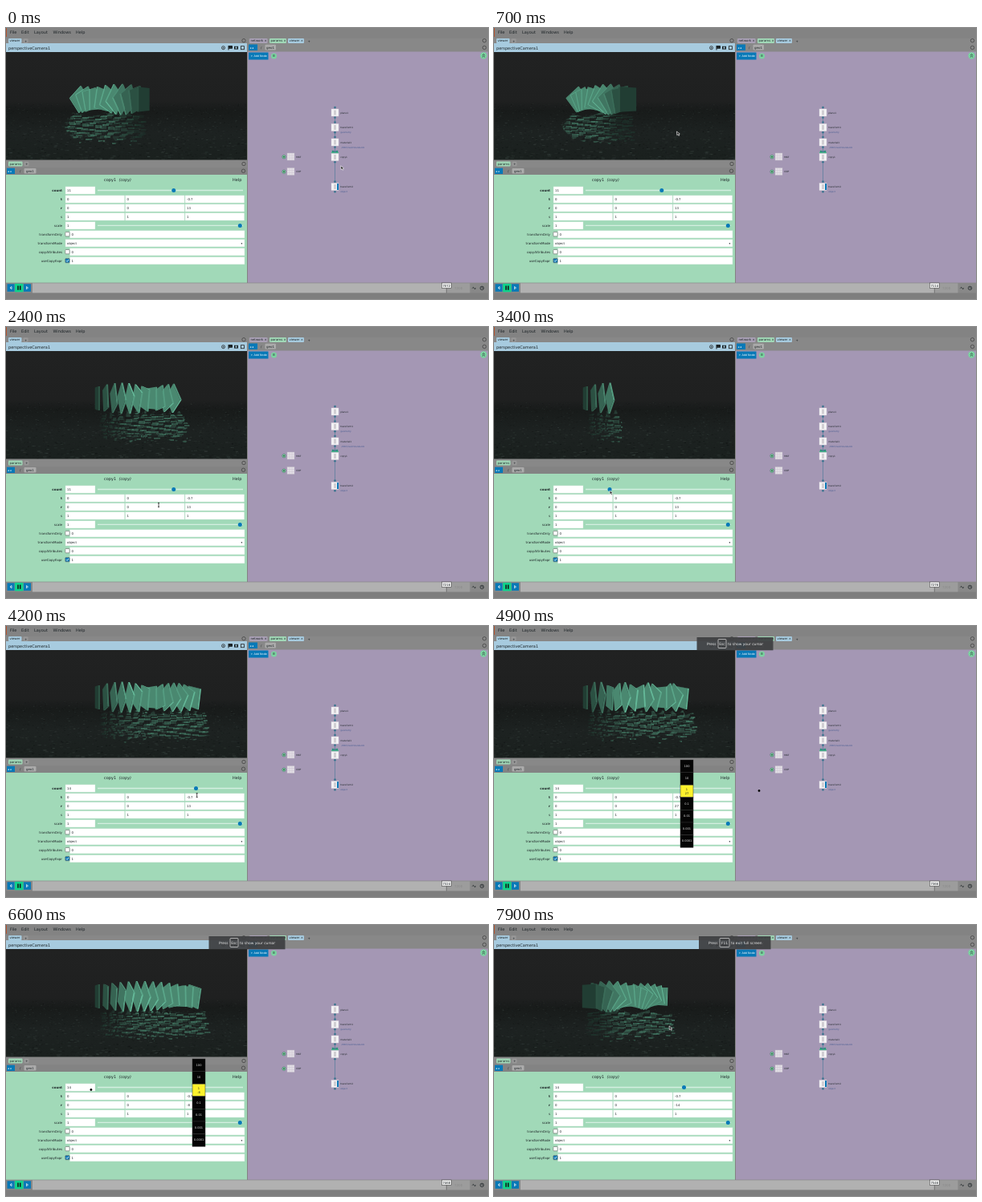
Animation, 600 px wide and 338 px high, one loop 8 s. Source, as an HTML page with a canvas:

```html
<!DOCTYPE html>
<html lang="en">
<head>
<meta charset="utf-8">
<title>Node editor</title>
<style>
html, body { margin: 0; width: 600px; height: 338px; overflow: hidden; background: #838383; }
canvas, svg { position: absolute; left: 0; top: 0; }
canvas { top: 30px; }
text { font-family: "DejaVu Sans", sans-serif; white-space: pre; }
</style>
</head>
<body>
<canvas id="view" width="300" height="135"></canvas>
<svg id="ui" width="600" height="338"></svg>
<script>
const LOOP = 8000, BLUE = '#0879b7', GREEN = '#7bd3a0', SKY = '#a7cbdf', INK = '#1c2326', GREY = '#838383';
const $ = id => document.getElementById(id);
const parts = [];
const add = s => parts.push(s);
const rect = (x, y, w, h, fill, more = '') => add(`<rect x="${x}" y="${y}" width="${w}" height="${h}" fill="${fill}" ${more}/>`);
const dot = (x, y, r, fill, more = '') => add(`<circle cx="${x}" cy="${y}" r="${r}" fill="${fill}" ${more}/>`);
const path = (d, stroke, more = '') => add(`<path d="${d}" fill="none" stroke="${stroke}" ${more}/>`);
const text = (x, y, s, size = 4, more = '') => add(`<text x="${x}" y="${y}" font-size="${size}" fill="${INK}" ${more}>${s}</text>`);
const ring = (x, y) => dot(x, y, 2.2, 'none', 'stroke="#444" stroke-width=".8"');
const tab = (x, y, w, s, fill) => { rect(x, y, w, 6, fill, 'rx="1"'); text(x + 1.5, y + 4.4, s, 3.9); };

function bars() {
  rect(0, 0, 600, 13, GREY);
  rect(0, 0, 1, 11, '#b0532f');
  [[5, 'File'], [19, 'Edit'], [35, 'Layout'], [58.5, 'Windows'], [87, 'Help']].forEach(([x, s]) => text(x, 7, s, 5));
  rect(0, 13, 600, 6, '#888');
  tab(3, 13, 16.5, 'viewer', SKY);
  rect(21.5, 13.3, 6, 5.4, '#979797', 'rx="1"');
  text(23, 17.5, '+');
  rect(0, 19, 300, 11, SKY);
  text(3, 26.6, 'perspectiveCamera1', 5);
  dot(270.5, 24.7, 2, 'none', 'stroke="#222" stroke-width=".8"');
  dot(270.5, 24.7, .7, INK);
  add(`<path d="M277 22v5.5M277 22.5h4.5v2.8h-4.5" stroke="${INK}" fill="${INK}"/>`);
  rect(284, 22.8, 5, 3.8, INK);
  dot(286.5, 24.7, 1.1, SKY);
  rect(292.5, 22.7, 4, 4, 'none', 'stroke="#222" stroke-width=".8"');
  ring(296, 15.7);
  rect(300, 13, 1, 305, GREY);
}

function network() {
  rect(301, 19, 299, 11, '#888');
  rect(301, 29.5, 299, 288.3, '#a497b4');
  tab(303, 13, 22.5, 'network ×', '#a9a0b5');
  tab(328, 13, 21, 'params ×', '#a1d8b7');
  tab(351, 13, 20, 'viewer ×', SKY);
  text(375.5, 17.5, '+');
  rect(302, 20.5, 11, 7.5, BLUE);
  text(303.5, 26, '◂ ◂', 3.5, 'style="fill:#fff"');
  text(317, 25.8, '/', 4);
  rect(322.5, 20.8, 13.5, 6.6, '#aaa', 'rx="1"');
  text(324, 25.6, 'geo1', 4);
  ring(595.5, 15.7);
  ring(595.5, 24.5);
  rect(302, 30.5, 24.5, 9, BLUE);
  text(304.5, 36.2, '+ Add Node', 3.4, 'style="fill:#fff"');
  dot(333.5, 35, 3.5, GREEN);
  text(331.8, 36.4, '☰', 3.6);
  dot(594.5, 34.5, 4.2, GREEN);
  path('M592.8 34.3l1.7-1.6 1.7 1.6M592.8 36.5l1.7-1.6 1.7 1.6', INK, 'stroke-width=".7"');
  path('M409.5 98V194', '#557b9d', 'stroke-width=".7"');
  const names = ['plane1', 'transform1', 'material1', 'copy1', 'transform2'];
  [101, 119.5, 138, 156.5, 193.5].forEach((y, i) => {
    rect(405, y, 9, 9, '#f3f2f4', 'stroke="#d5d0da" stroke-width=".4"');
    path(`M409.5 ${y + 1.5}v6`, '#cbc8ce', 'stroke-width="2.5"');
    dot(409.5, y - 2, 1.3, '#39748e');
    dot(409.5, y + 10.8, 1.3, '#39748e');
    text(416.2, y + 5.5, names[i], 2.9);
  });
  path('M405 155.5h9', '#48b78a', 'stroke-width="1.2"');
  dot(407, 154, 1.3, '#2c937c');
  dot(412, 154, 1.3, '#2c937c');
  rect(412, 194, 2, 8, BLUE);
  const note = 'style="fill:#475c91"';
  text(416.2, 131, 'geometry', 2.8, note);
  text(417.5, 149.5, '/MAT/meshStandard1', 2.7, note);
  text(416.2, 205.2, 'object', 2.8, note);
  [[156, 'MAT'], [174.5, 'COP']].forEach(([y, s]) => {
    rect(350, y, 9, 9, '#e4e0e7', 'stroke="#bdb5c4" stroke-width=".5"');
    path(`M350 ${y + 3}h9M350 ${y + 6}h9M353 ${y}v9M356 ${y}v9`, '#c9c3cf', 'stroke-width=".5"');
    dot(346, y + 4.7, 2.2, GREEN, 'stroke="#356b58" stroke-width=".5"');
    dot(346, y + 4.7, .8, INK);
    text(361.2, y + 5.5, s, 2.9);
  });
}

function params() {
  rect(0, 164.5, 300, 9.5, '#888');
  tab(3, 166.5, 17.5, 'params', '#a1d8b7');
  rect(22.5, 166.8, 6, 5.4, '#979797', 'rx="1"');
  text(24, 171.3, '+');
  rect(0, 174, 300, 9, GREY);
  rect(1, 174.7, 10, 7.3, BLUE);
  text(2, 180, '◂ ◂', 3.5, 'style="fill:#fff"');
  text(17, 180, '/', 4);
  rect(22.5, 175, 15, 6.5, '#aaa', 'rx="1"');
  text(25, 179.7, 'geo1', 3.9);
  ring(296, 169.5);
  ring(295.5, 178.3);
  rect(0, 183, 300, 134.8, '#a1d9b8');
  text(122, 191, 'copy1', 5);
  text(140.5, 191, '(copy)', 4.9, 'font-style="italic"');
  text(282, 191, 'Help', 5);
  const rows = ['count', 't', 'r', 's', 'scale', 'transformOnly', 'transformMode', 'copyAttributes', 'useCopyExpr'];
  const field = (x, y, w, s, id) => {
    rect(x, y - 4.6, w, 9.2, '#fff', 'stroke="#c6e2d2" stroke-width=".4"');
    text(x + 2, y + 1.4, s, 3.9, id ? `id="${id}"` : '');
  };
  const vectors = { 1: ['0', '0', '-0.7'], 2: ['0', '0', '13'], 3: ['1', '1', '1'] };
  rows.forEach((name, i) => {
    const y = 202.5 + i * 10.97;
    text(70, y + 1.3, name, 4, 'text-anchor="end"' + (i < 3 ? ' font-weight="bold"' : ''));
    if (vectors[i]) vectors[i].forEach((s, k) => field(74 + k * 74.5, y, 73.7, s, i == 2 && k == 2 ? 'turn' : ''));
    else if (i == 0 || i == 4) {
      field(74, y, 37, i ? '1' : '11', i ? '' : 'count');
      path(`M114 ${y}H295`, '#d3eee0', 'stroke-width="1.4"');
      dot(i ? 291.3 : 208.8, y, 2.5, BLUE, i ? '' : 'id="knob"');
    } else if (i == 6) {
      field(74, y, 223, 'object');
      text(292.5, y + 1.2, '▾', 3.5);
    } else {
      field(79.5, y, 217.5, i == 8 ? '1' : '0');
      rect(73.8, y - 2.8, 5.3, 5.3, i == 8 ? BLUE : '#fff', 'rx=".8" stroke="#666" stroke-width=".6"');
      if (i == 8) path(`M75 ${y}l1.1 1.1 2-2.5`, '#fff', 'stroke-width=".8"');
    }
  });
}

function timeline() {
  rect(0, 317.8, 600, 20.2, '#888');
  rect(0, 330.5, 600, 7.5, '#7e7e7e');
  rect(33, 318.3, 515.5, 12, '#b1b1b1');
  rect(548.5, 318.3, 29, 12, '#9c9c9c');
  rect(1.5, 319.3, 9, 9.5, BLUE);
  rect(11, 318.8, 10.5, 10.5, '#10d28b');
  rect(22, 319.3, 9, 9.5, BLUE);
  path('M7 322.5l-2 1.6 2 1.6zM25.5 322.5l2 1.6-2 1.6z', '#fff', 'stroke-width=".7"');
  path('M15 321.5v5.2M17.7 321.5v5.2', '#111', 'stroke-width="1.5"');
  path('M548.3 318v12.5', '#555', 'stroke-width=".6"');
  rect(542.3, 318, 12, 6.4, '#eee', 'stroke="#333" stroke-width=".5"');
  text(548.3, 322.6, '', 3.8, 'id="frame" text-anchor="middle"');
  text(558, 325.5, '7200', 4, 'style="fill:#888"');
  path('M580.5 324.5q1.2-2 2.2 0t2.2 0', INK, 'stroke-width="1"');
  dot(592.5, 324.4, 2.2, 'none', `stroke="${INK}" stroke-width=".8"`);
  path('M592.5 323v1.5h1.2', INK, 'stroke-width=".6"');
}

function overlays() {
  add('<g id="ladder">');
  ['100', '10', '1', '0.1', '0.01', '0.001', '0.0001'].forEach((s, i) => {
    const y = 167 + i * 15.6, now = i == 2;
    rect(232, y, 16, 15.6, now ? '#fdf22c' : '#050505', 'stroke="#2c2c2c" stroke-width=".5"');
    text(240, y + (now ? 6.3 : 8.7), s, 3.6, `text-anchor="middle" style="fill:${now ? '#222' : '#ddd'}"`);
  });
  text(240, 210, '', 3.6, 'id="step" text-anchor="middle"');
  add('</g>');
  const notice = (id, x, w, press, keyX, keyW, key, restX, rest) => {
    const pale = 'style="fill:#e8e8e8"';
    add(`<g id="${id}">`);
    rect(x, 14, w, 16.3, '#3f4042', 'opacity=".94"');
    text(press, 24, 'Press', 4.45, pale);
    rect(keyX, 16.5, keyW, 11, 'none', 'rx="1" stroke="#ddd" stroke-width=".7"');
    text(keyX + keyW / 2, 24, key, 4.45, pale + ' text-anchor="middle"');
    text(restX, 24, rest, 4.45, pale);
    add('</g>');
  };
  notice('lockNote', 252.5, 95, 265, 279, 10, 'Esc', 291, 'to show your cursor');
  notice('fullNote', 255, 89.5, 267, 281, 12, 'F11', 295, 'to exit full screen');
  add('<g id="mouse">');
  add('<path id="arrow" d="M0 0l.3 4.7 1.2-1 .9 1.7.9-.5-.9-1.6 1.5-.3z" fill="#222" stroke="#fff" stroke-width=".6"/>');
  path('M-1-2.5h2M0-2.5v5M-1 2.5h2', '#222', 'id="beam" stroke-width=".8"');
  dot(0, .5, 1.4, '#080808', 'id="spot"');
  add('</g>');
}

bars(); network(); params(); timeline(); overlays();
$('ui').innerHTML = parts.join('');

// Piecewise linear track: [time, value, value...]
function track(keys, t, k = 1) {
  const n = keys.findIndex(p => p[0] > t);
  if (n < 0) return keys[keys.length - 1][k];
  const a = keys[n - 1], b = keys[n];
  return a[k] + (b[k] - a[k]) * (t - a[0]) / (b[0] - a[0]);
}
const YAW = [[0, -57], [500, -57], [1400, 8], [1950, 75], [7300, 75], [7900, 50], [8000, 47]];
const MOUSE = [[0, 417, 172], [500, 250, 129], [1400, 149, 129], [1950, 60, 129], [2400, 190, 222],
  [2850, 208.8, 204], [3350, 144, 204], [3550, 144, 204], [4100, 236.5, 204], [4400, 240, 225],
  [4500, 240, 205], [4900, 330, 205], [5350, 330, 205], [6600, 106, 205], [7000, 68, 205],
  [7050, 68, 205], [7051, 240, 225], [7300, 180, 126], [7900, 218, 126], [8000, 222, 126]];

const view = $('view').getContext('2d');
const mirror = document.createElement('canvas');
mirror.width = 300; mirror.height = 135;
const glass = mirror.getContext('2d');

let seed = 7;
const rand = () => (seed = seed * 16807 % 2147483647) / 2147483647;
const streaks = Array.from({ length: 2200 }, () => ({ x: rand() * 340, y: rand(), w: rand(), a: rand() }));

// Square plates, each one further back and turned by a further step
function plates(g, yaw, count, turn) {
  const c = Math.cos(yaw), s = Math.sin(yaw), h = .95, thick = .07;
  const faces = [[0, 1, 2, 3], [7, 6, 5, 4], [1, 0, 4, 5], [2, 1, 5, 6], [3, 2, 6, 7], [0, 3, 7, 4]];
  const light = [.74, .6, .85, 1, .9, 1];
  for (let i = count - 1; i >= 0; i--) {
    const a = i * turn * Math.PI / 180, ca = Math.cos(a), sa = Math.sin(a), pts = [];
    for (const z of [thick, -thick])
      for (const [u, v] of [[-h, -h], [h, -h], [h, h], [-h, h]]) {
        const x = u * ca - v * sa, y = u * sa + v * ca, d = z + 2.1 - i * .7;
        const k = 14.5 * 18 / (18 - d * c - x * s);
        pts.push([144 + (x * c - d * s) * k, 59 - y * k]);
      }
    const glow = .45 + .55 * Math.min(1, i / 4);
    faces.forEach((f, n) => {
      const [p, q, r] = f.map(m => pts[m]);
      if ((q[0] - p[0]) * (r[1] - p[1]) - (q[1] - p[1]) * (r[0] - p[0]) >= 0) return;
      const b = glow * light[n];
      g.fillStyle = `rgb(${100 * b},${184 * b},${152 * b})`;
      g.beginPath();
      f.forEach(m => g.lineTo(...pts[m]));
      g.fill();
    });
  }
}

function drawView(t, yaw, count, turn) {
  const sky = view.createLinearGradient(0, 0, 0, 135);
  [[0, '#212222'], [.45, '#1f2020'], [.54, '#181b1a'], [.75, '#1d2221'], [1, '#1a201e']].forEach(p => sky.addColorStop(...p));
  view.fillStyle = sky;
  view.fillRect(0, 0, 300, 135);
  for (const p of streaks) {
    const y = 64 + 71 * p.y ** 1.2, near = (y - 58) / 75;
    const x = (p.x + yaw * 60 * near + t * .004 + 680) % 340 - 20;
    const a = p.a * .3 * (.6 + .4 * Math.sin(t / 300 + p.x));
    view.fillStyle = p.w > .5 ? `rgba(92,108,102,${a})` : `rgba(4,8,8,${a * 1.4})`;
    view.fillRect(x, y, 1 + 4 * p.w * near, .5 + near * .6);
  }
  glass.setTransform(1, 0, 0, 1, 0, 0);
  glass.clearRect(0, 0, 300, 135);
  glass.setTransform(1, 0, 0, -1, 0, 152);
  plates(glass, yaw, count, turn);
  // The rippled water breaks the reflection into shifted pieces
  for (let y = 72; y < 130; y += 2)
    for (let x = 60; x < 260; x += 8) {
      const grow = (y - 68) / 50;
      const wave = Math.sin(x * .31 + y * .8 + t / 260) + Math.sin(x * .17 - y * 1.3 - t / 190);
      view.globalAlpha = Math.max(0, .34 + .16 * wave) * (1 - grow * .3);
      view.drawImage(mirror, x, y, 8, 2, x + wave * 4 * grow + 8 * Math.sin(yaw), y + wave * 3 * grow, 8, 2);
    }
  view.globalAlpha = 1;
  plates(view, yaw, count, turn);
}

const show = (id, on) => $(id).style.display = on ? '' : 'none';
const start = performance.now();
function draw() {
  const t = (performance.now() - start) % LOOP;
  const mx = track(MOUSE, t), my = track(MOUSE, t, 2);
  const locked = t >= 4500 && t < 7050;
  const count = t < 2850 ? 11 : t < 4100 ? Math.round((mx - 107) / 9.25) : 14;
  const turn = t < 4500 ? 13 : locked ? Math.round(13 + (mx - 240) / 6.4) : -14;
  const beam = !locked && my > 207 && my < 240 && mx > 74 && mx < 297;
  drawView(t, track(YAW, t) * Math.PI / 180, count, turn);
  $('count').textContent = count;
  $('turn').textContent = $('step').textContent = turn;
  $('knob').setAttribute('cx', 107 + count * 9.25);
  $('frame').textContent = Math.floor(7072 + t * .06);
  $('mouse').setAttribute('transform', `translate(${mx} ${my})`);
  show('ladder', locked);
  show('lockNote', locked);
  show('fullNote', t >= 7050);
  show('spot', locked);
  show('beam', beam);
  show('arrow', !locked && !beam);
  requestAnimationFrame(draw);
}
draw();
</script>
</body>
</html>
```
